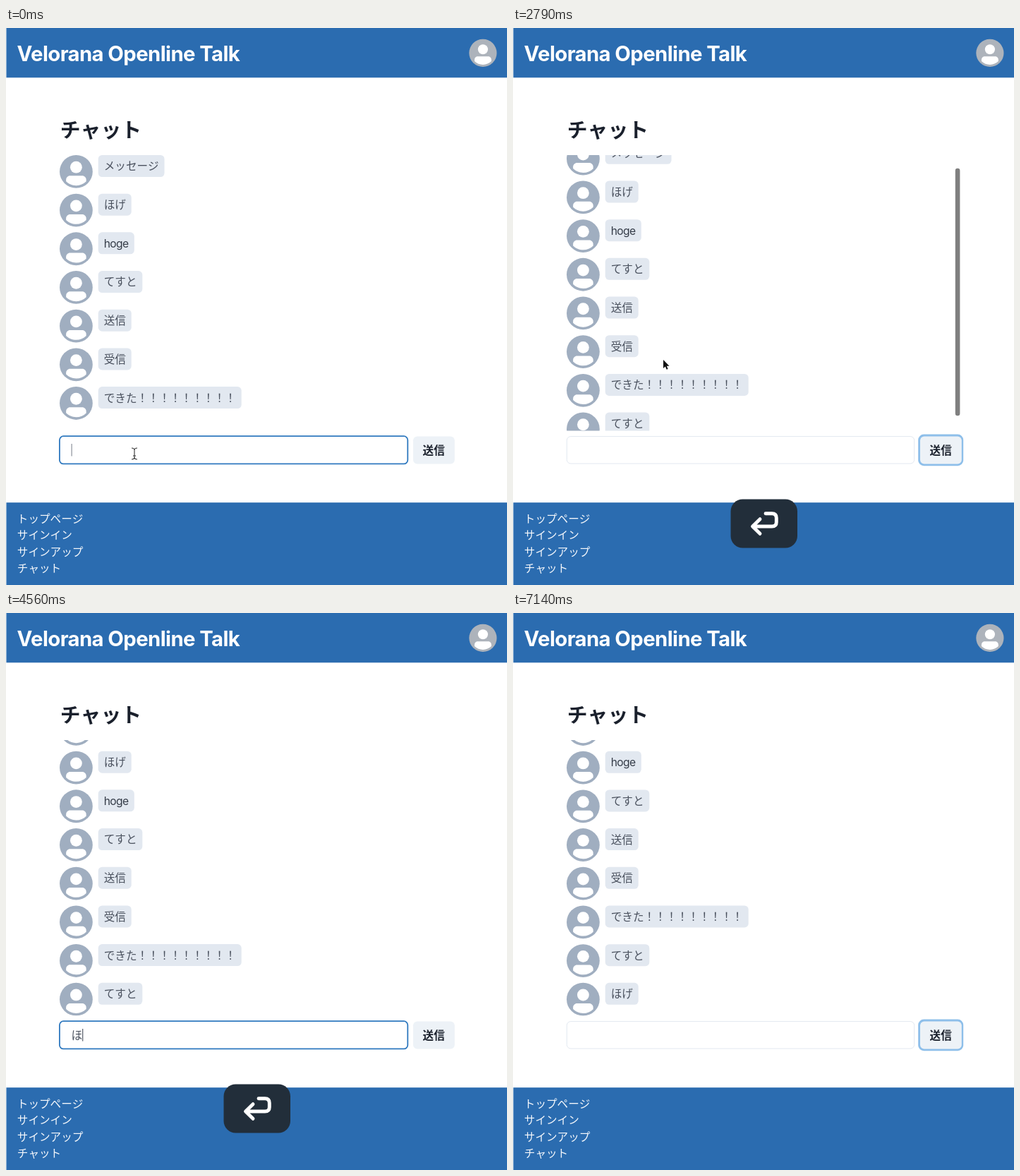
These frames come from a looping animation (710 by 789 pixels, 7200 ms). An HTML page with a canvas:

```html
<!DOCTYPE html>
<html lang="ja">
<head>
<meta charset="utf-8">
<title>チャット</title>
<style>
html, body { margin: 0; width: 100%; height: 100%; overflow: hidden; background: #fff; }
canvas { display: block; width: 710px; height: 789px; }
</style>
</head>
<body>
<canvas id="stage" width="710" height="789"></canvas>
<script>
const ctx = document.getElementById('stage').getContext('2d');
const LOOP = 7200;
const BLUE = '#2b6cb0';
const FONT = 'Inter, "Noto Sans CJK JP", "Noto Sans CJK", sans-serif';
const EM = 15.6;
const LIST = { top: 180, height: 390.5, pitch: 54.68, gap: 7.8 };
const MESSAGES = ['メッセージ', 'ほげ', 'hoge', 'てすと', '送信', '受信', 'できた' + '！'.repeat(9), 'てすと', 'ほげ'];
const LINKS = ['トップページ', 'サインイン', 'サインアップ', 'チャット'];

// [time, text] pairs; the last one reached is shown
const TYPED = [[0, ''], [520, 'て'], [720, 'てす'], [930, 'てすと'], [2130, ''], [4440, 'ほ'], [4680, 'ほげ'], [5700, '']];
const SCROLL = [[2600, 0], [3000, 39], [6040, 39], [6650, 93.6]];
const POINTER = [
  [[0, 182, 603], [400, 182, 603]],
  [[2400, 182, 603], [2600, 213, 470], [3000, 213, 470], [3360, 144, 585], [4380, 144, 585]],
  [[5820, 144, 585], [6030, 213.5, 447], [6850, 213.5, 447]]
];

const AVATAR_BODY = new Path2D('M103 102.1C93 112 79.4 118 64.2 118S35 111.8 25 101.8V95.2C25 86.8 32 80 40.6 80H87.4C96 80 103 86.8 103 95.2Z');
const ARROW = new Path2D('M0 0V12L2.8 9.4L4.7 13.7L6.6 12.9L4.8 8.7H8.5Z');
const RETURN = new Path2D('M358 687.7H367Q373.3 687.7 373.3 694V700Q373.3 706 367 706H340M350 695.7L339.5 706L350 716.3');

const within = (t, a, b) => t >= a && t < b;
const clamp = v => Math.max(0, Math.min(1, v));
const ease = v => v * v * (3 - 2 * v);

function along(keys, t, col = 1) {
  if (t <= keys[0][0]) return keys[0][col];
  for (let i = 1; i < keys.length; i++) {
    const a = keys[i - 1], b = keys[i];
    if (t <= b[0]) return a[col] + (b[col] - a[col]) * ease((t - a[0]) / (b[0] - a[0]));
  }
  return keys[keys.length - 1][col];
}

function box(x, y, w, h, r, fill, stroke, line = 1) {
  ctx.beginPath();
  ctx.roundRect(x, y, w, h, r);
  if (fill) { ctx.fillStyle = fill; ctx.fill(); }
  if (stroke) { ctx.strokeStyle = stroke; ctx.lineWidth = line; ctx.stroke(); }
}

function disc(x, y, r, fill) {
  ctx.beginPath();
  ctx.arc(x, y, r, 0, Math.PI * 2);
  ctx.fillStyle = fill;
  ctx.fill();
}

// y is the middle of the line
function label(str, x, y, { size = EM, weight = 400, color = '#4a515e', spacing = 0, align = 'left' } = {}) {
  ctx.font = `${weight} ${size}px ${FONT}`;
  ctx.letterSpacing = spacing + 'px';
  ctx.textAlign = align;
  ctx.fillStyle = color;
  ctx.fillText(str, x, y + size * 0.38);
  ctx.letterSpacing = '0px';
}

function avatar(x, y, size, color) {
  ctx.save();
  ctx.translate(x, y);
  ctx.scale(size / 128, size / 128);
  disc(64, 64, 64, color);
  disc(64, 47, 23, '#fff');
  ctx.fill(AVATAR_BODY);
  ctx.restore();
}

function drawPage() {
  ctx.fillStyle = '#fff';
  ctx.fillRect(0, 0, 710, 789);
  ctx.fillStyle = BLUE;
  ctx.fillRect(0.5, 0, 710, 70.3);
  ctx.fillRect(0.5, 672.2, 710, 117);
  label('Velorana Openline Talk', 15.6, 35.5, { size: 29.3, weight: 700, color: '#fff', spacing: -0.6 });
  avatar(656.3, 15.8, 39.2, '#adb3bb');
  label('チャット', 76.8, 144, { size: 28.8, weight: 700, color: '#1a202c' });
  LINKS.forEach((s, i) => label(s, 15.8, 695 + i * 23.5, { color: '#f4f7fb' }));
}

function drawList(t) {
  const count = t < 2130 ? 7 : t < 5700 ? 8 : 9;
  const scroll = along(SCROLL, t);
  ctx.save();
  ctx.beginPath();
  ctx.rect(70, LIST.top, 570, LIST.height);
  ctx.clip();
  for (let i = 0; i < count; i++) {
    const y = LIST.top + i * LIST.pitch - scroll;
    const msg = MESSAGES[i];
    const latin = msg === 'hoge';
    avatar(76, y, 46.8, '#a0aec0');
    box(130.7, y, (latin ? 35.3 : msg.length * EM) + 15.8, 31, 5.5, '#e2e8f0');
    label(msg, 138.7, y + 15.5, latin ? { color: '#343b47', spacing: -0.6 } : { weight: 300 });
  }
  ctx.restore();

  const shown = t < 5000
    ? clamp((t - 2560) / 60) * clamp((3280 - t) / 200)
    : clamp((t - 5990) / 60) * clamp((7050 - t) / 200);
  if (shown > 0) {
    const full = count * LIST.pitch - LIST.gap, track = LIST.height - 5;
    ctx.globalAlpha = shown;
    box(626.8, 182.5 + scroll / full * track, 6.6, track * LIST.height / full, 3.3, '#7f7f7f');
    ctx.globalAlpha = 1;
  }
}

function drawForm(t) {
  const onButton = within(t, 1850, 3360) || t >= 5400;
  if (onButton) box(76.3, 578.6, 492.4, 38.4, 5.5, '#fff', '#e2e8f0');
  else box(75.9, 578.2, 493.4, 39.2, 5.5, '#fff', '#2f79bf', 1.8);

  if (onButton) box(574.2, 575.6, 64, 44.6, 8, '#8ebfea');
  box(577, 578.5, 58.8, 39, 5.8, '#edf2f7');
  label('送信', 606.2, 598, { weight: 600, color: '#1a202c', align: 'center' });

  const text = TYPED.filter(k => k[0] <= t).pop()[1];
  label(text, 92.6, 598, { weight: 300 });
  const blinkOff = within(t, 3880, 4380);
  if (!onButton && !blinkOff) {
    ctx.fillStyle = text ? '#555b66' : '#8d929b';
    ctx.fillRect(92.5 + text.length * EM, 589, 1.2, 17.5);
  }
}

function drawCandidates() {
  ctx.save();
  ctx.shadowColor = 'rgba(0,0,0,.4)';
  ctx.shadowBlur = 12;
  ctx.shadowOffsetY = 4;
  box(89, 606.5, 147.5, 73.5, 0, '#fff');
  ctx.restore();
  box(89, 606.5, 147.5, 73.5, 0, null, '#8c8c8c');
  ctx.fillStyle = '#777';
  ctx.fillRect(89, 660, 147.5, 1.2);
  const style = { size: 12.4, color: '#333' };
  ['テスト', 'テスト期間', 'テスト前'].forEach((s, i) => label(s, 93.5, 617.2 + i * 17.6, style));
  label('Tab キーで選択', 94, 671.3, { ...style, spacing: -0.2 });
  label('[全] カタカナ', 229, 617.2, { size: 10.9, color: '#9a9a9a', align: 'right' });
}

function drawReturnKey() {
  box(308.5, 667.5, 94.5, 69, 17, '#222e3a');
  ctx.strokeStyle = '#fff';
  ctx.lineWidth = 4.9;
  ctx.lineCap = ctx.lineJoin = 'round';
  ctx.stroke(RETURN);
  ctx.lineCap = 'butt';
  ctx.lineJoin = 'miter';
}

function drawBeam(x, y) {
  const beam = new Path2D(`M${x - 4} ${y - 8}Q${x} ${y - 8} ${x} ${y - 5}V${y + 5}Q${x} ${y + 8} ${x - 4} ${y + 8}M${x + 4} ${y - 8}Q${x} ${y - 8} ${x} ${y - 5}M${x + 4} ${y + 8}Q${x} ${y + 8} ${x} ${y + 5}M${x - 2} ${y + 3}H${x + 2}`);
  ctx.strokeStyle = '#fff';
  ctx.lineWidth = 2.6;
  ctx.stroke(beam);
  ctx.strokeStyle = '#333';
  ctx.lineWidth = 1.1;
  ctx.stroke(beam);
}

function drawPointer(t) {
  const path = POINTER.find(p => within(t, p[0][0], p[p.length - 1][0]));
  if (!path) return;
  const x = along(path, t, 1), y = along(path, t, 2);
  if (within(t, 3360, 3640)) {
    ctx.globalAlpha = clamp((3640 - t) / 120);
    ctx.beginPath();
    ctx.arc(x, y, 22, 0, Math.PI * 2);
    ctx.fillStyle = 'rgba(255,255,255,.35)';
    ctx.fill();
    ctx.strokeStyle = 'rgba(160,211,150,.9)';
    ctx.lineWidth = 2.6;
    ctx.stroke();
    ctx.globalAlpha = 1;
  }
  if (y > 578) return drawBeam(x, y);
  ctx.save();
  ctx.translate(x, y);
  ctx.strokeStyle = '#fff';
  ctx.lineWidth = 2;
  ctx.stroke(ARROW);
  ctx.fillStyle = '#111';
  ctx.fill(ARROW);
  ctx.restore();
}

function draw(t) {
  drawPage();
  drawList(t);
  drawForm(t);
  if (within(t, 960, 1500)) drawCandidates();
  if (within(t, 1500, 2850) || within(t, 4500, 6450)) drawReturnKey();
  drawPointer(t);
}

const start = performance.now();
function tick() {
  draw((performance.now() - start) % LOOP);
  requestAnimationFrame(tick);
}
tick();
</script>
</body>
</html>
```
